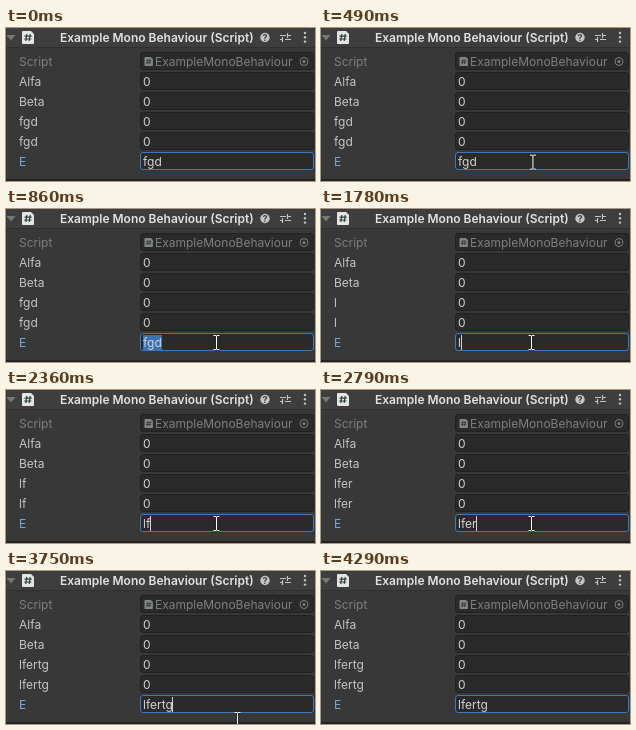
Write an HTML page that moves like this. It is 309 by 153 pixels and loops after 4350 ms.

```html
<!DOCTYPE html>
<html lang="en">
<head>
<meta charset="utf-8">
<style>
  html, body { margin: 0; width: 100%; height: 100%; overflow: hidden; background: #383838; }
  svg { display: block; }
  text { font: 12px Inter, sans-serif; fill: #c4c4c4; white-space: pre; }
  .title { font-weight: 600; fill: #e2e2e2; }
  .value { fill: #d2d2d2; }
  .dim { fill: #7e7e7e; }
  .field { fill: #2a2a2a; stroke: #212121; }
  .focused { stroke: #3a79bb; }
  .active { fill: #7ba6d6; }
</style>
</head>
<body>
<svg width="309" height="153" viewBox="0 0 309 153">
  <defs>
    <g id="script">
      <path d="M1 0h8l3 3v9q0 1 -1 1h-10q-1 0 -1 -1v-11q0 -1 1 -1z"/>
      <path d="M4.8 3L3.8 10M8.2 3L7.2 10M2.5 5.2h7.2M2.2 8h7.2" stroke="#2c4034" stroke-width="1.2"/>
    </g>
  </defs>

  <rect width="309" height="19" fill="#3e3e3e"/>
  <rect y="19" width="309" height="1" fill="#303030"/>
  <rect y="151" width="309" height="2" fill="#222"/>
  <path d="M.5 7h9l-4.5 5.5z" fill="#777"/>
  <use href="#script" x="16" y="3" fill="#e4e4e4"/>
  <text class="title" x="54" y="14">Example Mono Behaviour (Script)</text>
  <circle cx="259" cy="9.5" r="4.7" fill="#c4c4c4"/>
  <text x="259" y="12.7" text-anchor="middle" style="font-size:9px;font-weight:700;fill:#3e3e3e">?</text>
  <path d="M274 7.5h6M282 7.5h3M274 11.5h2M279 11.5h6M281.5 5v5M276.5 9v5" stroke="#c4c4c4" stroke-width="1.2"/>
  <g fill="#c4c4c4">
    <circle cx="299" cy="5" r="1.2"/><circle cx="299" cy="9.3" r="1.2"/><circle cx="299" cy="13.6" r="1.2"/>
  </g>

  <g id="rows"></g>

  <rect id="selection" x="137" y="126" width="19" height="15" fill="#3a72b0"/>
  <text id="typed" class="value" x="137" y="138"></text>
  <rect id="caret" y="126" width="1" height="15" fill="#d2d2d2"/>
  <circle id="click" cx="208" cy="133" r="12" fill="#aaa81c"/>
  <g id="pointer" fill="none">
    <path d="M-3 -7h2.5l.5 .5l.5 -.5h2.5M0 -6.5v13M-3 7h2.5l.5 -.5l.5 .5h2.5" stroke="#222" stroke-width="2"/>
    <path d="M-3 -7h2.5l.5 .5l.5 -.5h2.5M0 -6.5v13M-3 7h2.5l.5 -.5l.5 .5h2.5" stroke="#fff"/>
  </g>
</svg>
<script>
const LOOP = 4350;
const $ = id => document.getElementById(id);

const field = (y, cls = '') =>
  `<rect class="field ${cls}" x="134.5" y="${y - .5}" width="173" height="17" rx="2.5"/>`;
const label = (text, y, cls = '', id = '') =>
  `<text ${id && `id="${id}"`} class="${cls}" x="13" y="${y + 13}">${text}</text>`;
const numberRow = (text, y, id) =>
  label(text, y, '', id) + field(y) + `<text class="value" x="137" y="${y + 13}">0</text>`;

$('rows').innerHTML =
  label('Script', 25, 'dim') +
  `<g>${field(25)}
    <use href="#script" transform="translate(138.5 29) scale(.7)" fill="#858585"/>
    <text class="dim" x="149" y="38">ExampleMonoBehaviour</text>
    <circle cx="298" cy="33.5" r="4" fill="none" stroke="#7e7e7e"/>
    <circle cx="298" cy="33.5" r="1.5" fill="#7e7e7e"/></g>` +
  numberRow('Alfa', 45) + numberRow('Beta', 65) +
  numberRow('', 85, 'name1') + numberRow('', 105, 'name2') +
  label('E', 125, 'active') + field(125, 'focused');

// time, text, caret x
const keys = [
  [0, 'fgd', 156], [1780, 'l', 140], [2360, 'lf', 144], [2560, 'lfe', 151],
  [2790, 'lfer', 155], [3140, 'lfert', 159], [3390, 'lfertg', 166]
];

const show = (id, on) => $(id).setAttribute('visibility', on ? 'visible' : 'hidden');
const within = (t, from, to) => t >= from && t < to;

function pointerAt(t) {
  if (t < 520) {
    const left = (1 - Math.floor((t - 330) / 38) / 5) ** 2;
    return [210 + 36 * left, 133.5 + 16 * left];
  }
  if (t < 3720) return [210, 133.5];
  return t < 3750 ? [214, 137.5] : [231, 148.5];
}

function draw(t) {
  const [, text, caretX] = keys.findLast(key => key[0] <= t);
  for (const id of ['name1', 'name2', 'typed']) $(id).textContent = text;
  $('caret').setAttribute('x', caretX);
  show('caret', within(t, 1780, 4290));
  show('selection', within(t, 820, 1780));
  show('click', within(t, 750, 780) || within(t, 820, 860));
  show('pointer', within(t, 330, 3780));
  const [x, y] = pointerAt(t);
  $('pointer').setAttribute('transform', `translate(${x + .5} ${y})`);
}

const start = performance.now();
function tick() {
  draw((performance.now() - start) % LOOP);
  requestAnimationFrame(tick);
}
tick();
</script>
</body>
</html>
```
